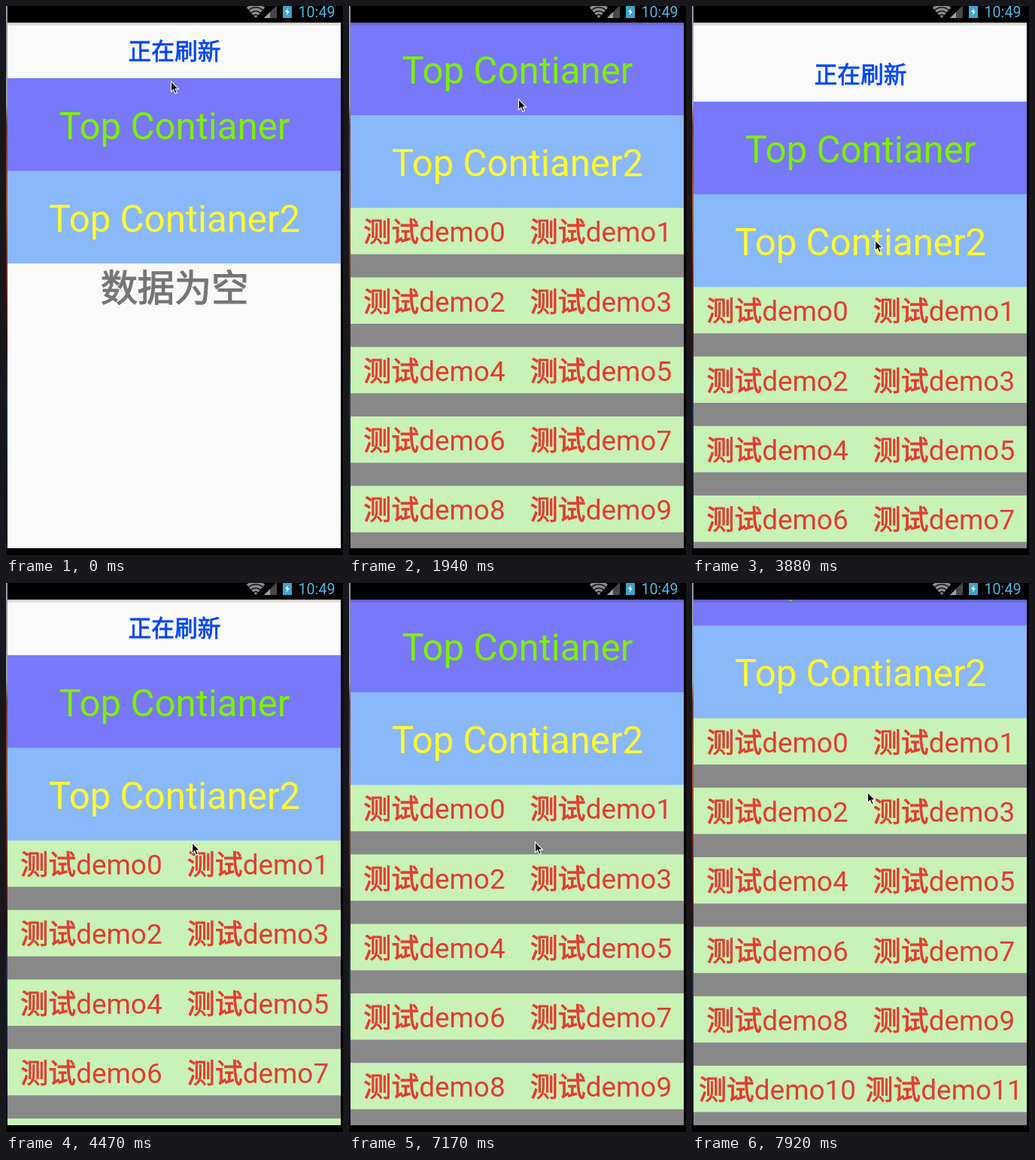
Animation, 448 px wide and 729 px high, one loop 8000 ms. Source, as an HTML page:

```html
<!DOCTYPE html>
<html lang="zh-CN">
<head>
<meta charset="utf-8">
<title>Pull to refresh</title>
<style>
  html, body { margin: 0; width: 100%; height: 100%; overflow: hidden; background: #000; }
  svg { display: block; width: 448px; height: 729px; }
  text { font-family: Roboto, "Noto Sans CJK SC", "Noto Sans CJK", sans-serif; text-anchor: middle; }
  .title { font-size: 49.2px; }
  .item { font-size: 36.9px; fill: #e43c30; color: #e43c30; }
  .han { stroke: currentColor; stroke-width: .025em; }

  .page, .pointer, .list, .empty { animation: 8s step-end infinite; }
  .page { animation-name: scroll; }
  .pointer { animation-name: point; }
  .list { animation-name: fill; }
  .empty { animation-name: clear; }

  /* y is the top edge of the first banner */
  @keyframes scroll {
    0% { transform: translate(0, 95.8px); }
    22.375% { transform: translate(0, 89.8px); }
    24.25% { transform: translate(0, 22px); }
    46.625% { transform: translate(0, 43.4px); }
    48.5% { transform: translate(0, 127px); }
    50.375% { transform: translate(0, 151px); }
    54% { transform: translate(0, 100px); }
    55.875% { transform: translate(0, 95.8px); }
    82.125% { transform: translate(0, 43.4px); }
    84% { transform: translate(0, 22px); }
    91.5% { transform: translate(0, -105px); }
    93.375% { transform: translate(0, -232.6px); }
    97.125% { transform: translate(0, -165px); }
    99%, 100% { transform: translate(0, -66.6px); }
  }
  @keyframes point {
    0% { transform: translate(219px, 99px); }
    1.875% { transform: translate(219px, 101px); }
    7.5% { transform: translate(220px, 104px); }
    9.25% { transform: translate(225px, 123px); }
    44.75% { transform: translate(226px, 160px); }
    46.625% { transform: translate(230px, 190px); }
    48.5% { transform: translate(243px, 310px); }
    50.375% { transform: translate(247px, 344px); }
    89.625% { transform: translate(247px, 343px); }
    91.5% { transform: translate(246px, 212px); }
    93.375% { transform: translate(244px, 79px); }
    97.125% { transform: translate(240px, 180px); }
    99%, 100% { transform: translate(233px, 277px); }
  }
  @keyframes fill { 0% { visibility: hidden; } 22.375%, 100% { visibility: visible; } }
  @keyframes clear { 0% { visibility: visible; } 22.375%, 100% { visibility: hidden; } }
</style>
</head>
<body>
<svg viewBox="0 0 448 729">
  <defs>
    <linearGradient id="edge" x2="0" y2="1">
      <stop offset="0" stop-color="#8d97a8"/>
      <stop offset=".18" stop-color="#9a9ea8"/>
      <stop offset=".22" stop-color="#6b3a34"/>
      <stop offset=".36" stop-color="#a04f38"/>
      <stop offset=".5" stop-color="#6a261f"/>
      <stop offset=".62" stop-color="#34181c"/>
      <stop offset=".72" stop-color="#26344e"/>
      <stop offset="1" stop-color="#0a0f1c"/>
    </linearGradient>
    <linearGradient id="shade" x2="0" y2="1">
      <stop offset="0" stop-opacity=".22"/>
      <stop offset="1" stop-opacity="0"/>
    </linearGradient>
    <clipPath id="screen"><rect x="2" y="22" width="443" height="698"/></clipPath>
    <clipPath id="fan"><path d="M332 16 L318 0 H346 Z"/></clipPath>
  </defs>

  <rect width="448" height="729"/>
  <rect width="2" height="720" fill="url(#edge)"/>

  <g clip-path="url(#screen)">
    <rect x="2" y="22" width="443" height="698" fill="#fafafa"/>
    <g class="page">
      <text class="han" x="224" y="-25" font-size="30.75" fill="#0046f5" color="#0046f5">正在刷新</text>
      <g class="list" id="list"><rect x="2" y="240" width="443" height="744" fill="#c8f2b6"/></g>
      <rect x="2" width="443" height="125" fill="#7878fa"/>
      <rect x="2" y="123.06" width="443" height="123.06" fill="#8ab8fc"/>
      <text class="title" x="224" y="81" fill="#7df000">Top Contianer</text>
      <text class="title" x="224" y="204" fill="#fffa30">Top Contianer2</text>
      <text class="title han empty" x="224" y="296" fill="#757575" color="#757575">数据为空</text>
    </g>
    <rect x="2" y="22" width="443" height="5" fill="url(#shade)"/>
  </g>

  <g id="status">
    <g clip-path="url(#fan)" fill="none" stroke="#8c8c8c" stroke-width="3.6">
      <circle cx="332" cy="16" r="2"/>
      <circle cx="332" cy="16" r="7"/>
      <circle cx="332" cy="16" r="11.8"/>
      <circle cx="332" cy="16" r="16.6"/>
    </g>
    <path d="M343 16 L360 -1 V16 Z" fill="#484848"/>
    <path d="M343 16 L351 8 V16 Z" fill="#a0a0a0"/>
    <rect x="368" y="0" width="12" height="16" fill="#3fa3cc"/>
    <path d="M375 3 L371 8 H373.5 L372.7 12.5 L377 7 H374.3 Z" fill="#fff"/>
    <text x="413" y="14.5" font-size="19.7" fill="#4db8e6">10:49</text>
  </g>

  <g class="pointer">
    <path d="M.5 .8 V14.8 L3.7 11.9 L5.9 17.2 L8.3 16.2 L6.1 11.1 H10.5 Z"
          fill="#000" stroke="#fff" stroke-width="1.1"/>
  </g>
</svg>
<script>
  const list = document.getElementById('list');
  const DP = 443 / 360;

  function add(parent, tag, attrs, label = '') {
    const node = document.createElementNS('http://www.w3.org/2000/svg', tag);
    for (const key in attrs) node.setAttribute(key, attrs[key]);
    node.textContent = label;
    parent.append(node);
    return node;
  }

  for (let row = 0; row < 8; row++) {
    const y = (200 + row * 75) * DP;
    add(list, 'rect', { x: 2, y: y + 50 * DP, width: 443, height: 25 * DP, fill: '#888' });
    [113.5, 335].forEach((x, col) => {
      const text = add(list, 'text', { class: 'item', x, y: y + 45.2 });
      add(text, 'tspan', { class: 'han' }, '测试');
      add(text, 'tspan', {}, 'demo' + (row * 2 + col));
    });
  }
</script>
</body>
</html>
```
